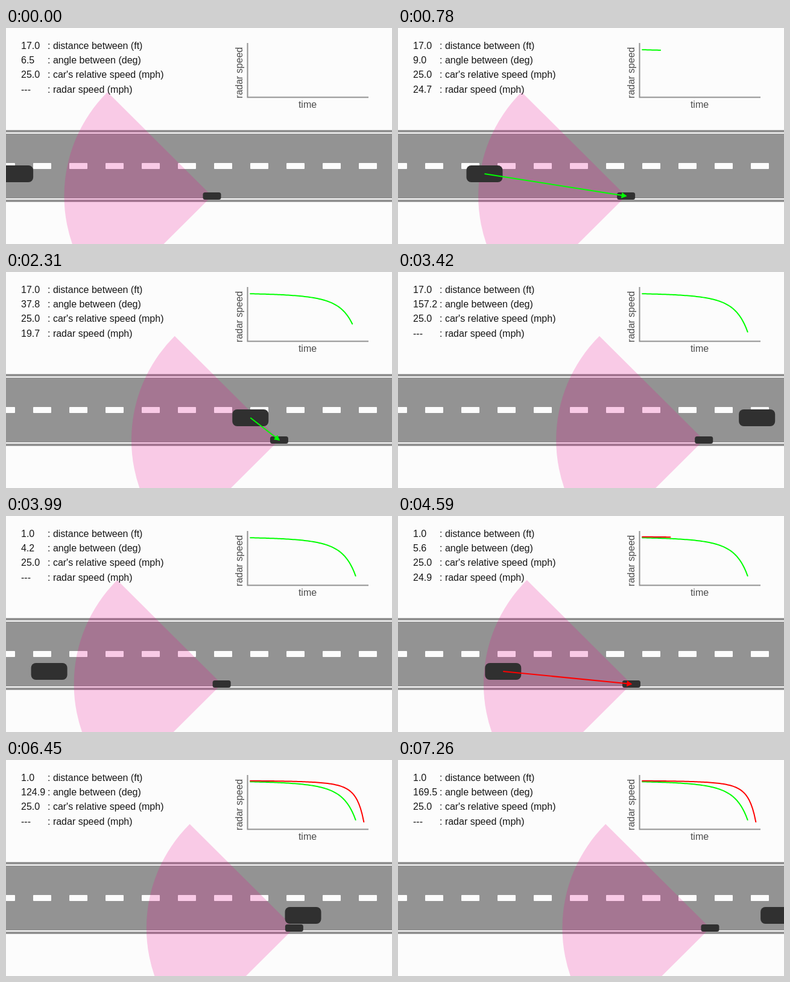
An HTML page for the animation above (7290 ms loop, 640 by 360 pixels).

```html
<!DOCTYPE html>
<html lang="en">
<head>
<meta charset="utf-8">
<title>Radar cosine effect</title>
<style>
  html, body { margin: 0; width: 100%; height: 100%; overflow: hidden; background: #fcfcfc; }
  svg { display: block; width: 640px; height: 360px; }
  text { font: 16px "Liberation Sans", Arial, sans-serif; fill: #161616; white-space: pre; }
  .label { fill: #4c4c4c; text-anchor: middle; }
  .axis { fill: none; stroke: #929292; stroke-width: 2; }
  .car { fill: #303030; }
  .trace { fill: none; stroke-width: 2; stroke-linecap: round; stroke-linejoin: round; }
</style>
</head>
<body>
<svg viewBox="0 0 640 360">
  <rect width="640" height="360" fill="#fcfcfc"/>

  <rect y="170" width="640" height="120" fill="#939393"/>
  <path d="M0 175H640M0 285H640" stroke="#fcfcfc" stroke-width="2"/>
  <g id="dashes" fill="#fcfcfc"></g>

  <g id="radar">
    <path d="M0 0L-173.24 173.24A245 245 0 0 1 -173.24 -173.24Z" fill="rgb(236,0,140)" fill-opacity=".2"/>
    <rect class="car" x="-15" y="-6" width="30" height="12" rx="3.5"/>
  </g>
  <rect class="car" id="target" x="-30" y="-14" width="60" height="28" rx="8"/>

  <g id="echo">
    <line id="ray" stroke-width="2"/>
    <path id="head" d="M1.5 0L-7.5 -5V5Z" stroke="none"/>
  </g>

  <path class="axis" d="M400.5 25V115.5H601"/>
  <text class="label" x="500" y="133">time</text>
  <text class="label" transform="translate(392 74.5) rotate(-90)">radar speed</text>
  <polyline class="trace" id="trace0" stroke="#0f0"/>
  <polyline class="trace" id="trace1" stroke="#f00"/>

  <text id="distance" x="25" y="35"></text><text x="69" y="35">: distance between (ft)</text>
  <text id="angle" x="25" y="59"></text><text x="69" y="59">: angle between (deg)</text>
  <text x="25" y="83">25.0</text><text x="69" y="83">: car's relative speed (mph)</text>
  <text id="speed" x="25" y="108"></text><text x="69" y="108">: radar speed (mph)</text>
</svg>

<script>
  const LOOP = 7290, TICK = 30, STEPS = 121;
  const PX_PER_MPH = 22 / 150;          // pixels moved per step
  const RADAR_Y = 280, REACH = 245, FIRST_HIT = 14;
  const RUNS = [
    { distance: '17.0', y: 243, color: '#0f0' },
    { distance: '1.0', y: 259, color: '#f00' }
  ];

  const el = id => document.getElementById(id);
  const set = (id, attrs) => {
    for (const name in attrs) el(id).setAttribute(name, attrs[name]);
  };
  const moveTo = (x, y) => `translate(${x} ${y})`;

  for (let x = -15; x < 640; x += 60) {
    const dash = document.createElementNS('http://www.w3.org/2000/svg', 'rect');
    for (const [name, value] of Object.entries({ x, y: 225, width: 30, height: 10, rx: 1 }))
      dash.setAttribute(name, value);
    el('dashes').append(dash);
  }

  function measure(run, step) {
    const carX = 10 + 35 * PX_PER_MPH * (step + 1);
    const radarX = 340 + 10 * PX_PER_MPH * (step + 1);
    const dx = radarX - carX, dy = RADAR_Y - run.y;
    const angle = Math.atan2(dy, dx);
    return {
      carX, radarX, angle,
      speed: 25 * Math.cos(angle),
      hit: step >= FIRST_HIT && dx - 30 < REACH + 0.01 && dx > dy
    };
  }

  function trace(run, lastStep) {
    const points = [];
    for (let step = FIRST_HIT; step <= lastStep; step++) {
      const { hit, speed } = measure(run, step);
      if (!hit) break;
      const x = 405.1 + (step - FIRST_HIT) * 30 / 11;
      const y = 34 + 10 * (25 - speed);
      points.push(x.toFixed(2) + ',' + y.toFixed(2));
    }
    return points.join(' ');
  }

  function draw(time) {
    // The opening picture is held for two ticks.
    const tick = Math.max(0, Math.floor(time / TICK) - 1);
    const index = Math.floor(tick / STEPS), step = tick % STEPS;
    const run = RUNS[index];
    const m = measure(run, step);

    set('target', { transform: moveTo(m.carX, run.y) });
    set('radar', { transform: moveTo(m.radarX, RADAR_Y) });

    set('echo', { visibility: m.hit ? 'visible' : 'hidden', stroke: run.color, fill: run.color });
    set('ray', { x1: m.carX, y1: run.y, x2: m.radarX, y2: RADAR_Y });
    set('head', { transform: `${moveTo(m.radarX, RADAR_Y)} rotate(${m.angle * 180 / Math.PI})` });

    set('trace0', { points: trace(RUNS[0], index ? STEPS : step) });
    set('trace1', { points: index ? trace(RUNS[1], step) : '' });

    el('distance').textContent = run.distance;
    el('angle').textContent = (m.angle * 180 / Math.PI).toFixed(1);
    el('speed').textContent = m.hit ? m.speed.toFixed(1) : '---';
  }

  const start = performance.now();
  function frame() {
    draw((performance.now() - start) % LOOP);
    requestAnimationFrame(frame);
  }
  frame();
</script>
</body>
</html>
```
